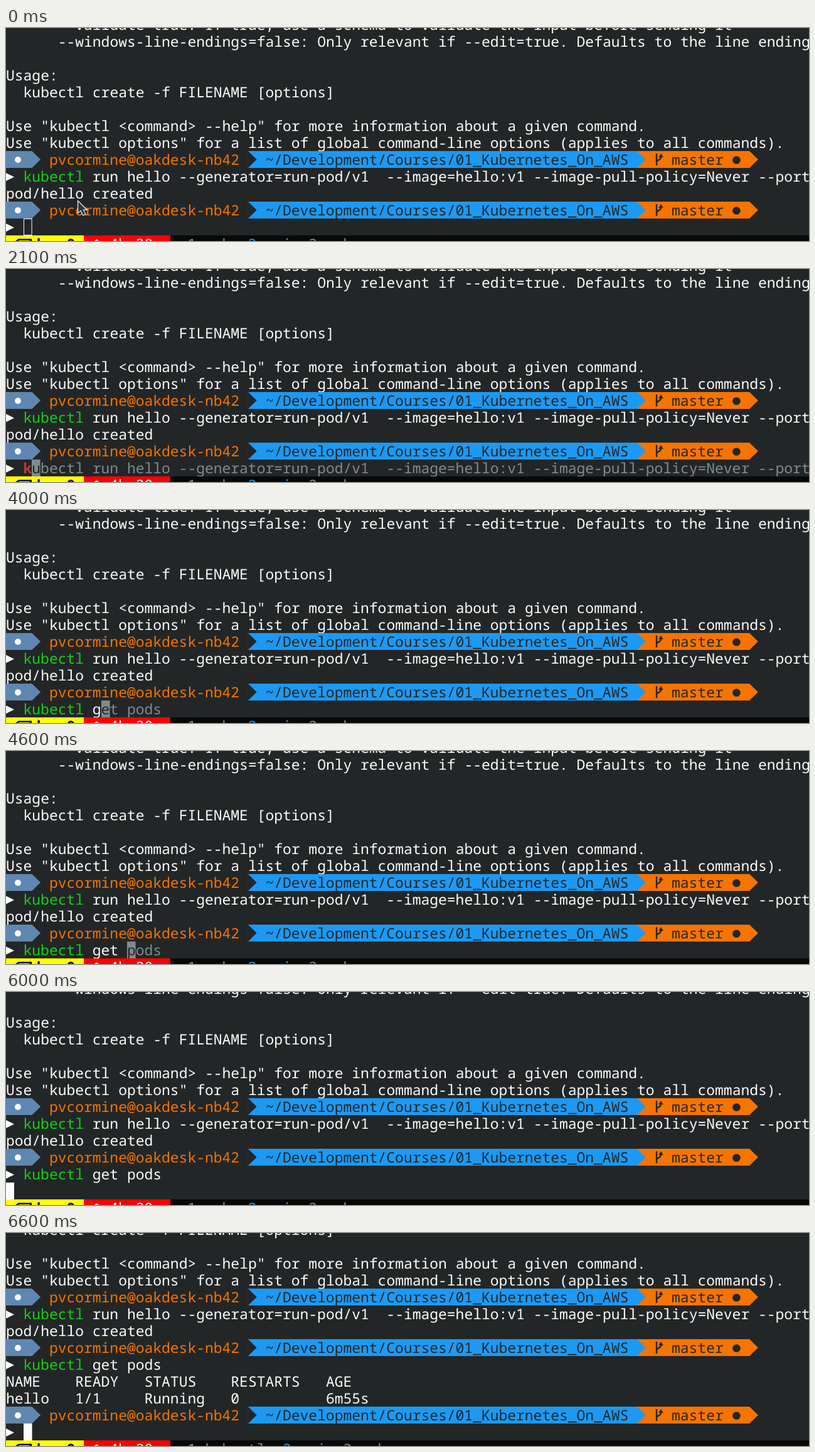
An HTML page that plays this animation: 1280x341 px, repeating every 8000 ms.

```html
<!DOCTYPE html>
<html lang="en">
<head>
<meta charset="utf-8">
<title>Terminal session</title>
<style>
html, body { margin: 0; width: 100%; height: 100%; overflow: hidden; background: #232627; }
svg { display: block; width: 1280px; height: 341px; }
text {
  font-family: "Noto Sans Mono", "DejaVu Sans Mono", monospace;
  font-size: 22.97px;
  white-space: pre;
  text-rendering: geometricPrecision;
}
</style>
</head>
<body>
<svg id="stage" viewBox="0 0 1280 341"></svg>
<script>
const LOOP = 8000, CELL = 13.78, ROW = 27, TOP = -19, BASE = 21.5, STATUS_Y = 332;
const C = {
  bg: '#232627', fg: '#fcfcfc', dim: '#7f8c8d', red: '#c0392b', green: '#11d116',
  blue: '#1d99f3', orange: '#f67400', slate: '#5f87af'
};
const CMD = 'kubectl get pods';
const RUN = 'kubectl run hello --generator=run-pod/v1  --image=hello:v1 --image-pull-policy=Never --port';

// [time, value] steps
const TYPED = [[0, 0], [2100, 1], [2400, 2], [2500, 3], [3100, 5], [3300, 6], [3500, 7], [3700, 8],
  [4000, 9], [4200, 10], [4400, 11], [4600, 12], [4800, 13], [5000, 14], [5100, 15], [5300, 16]];
const SCROLL = [[0, 0], [6000, 1], [6300, 2], [6400, 3], [6600, 4]];
const FOCUS = 1100, POINTER_OFF = 2100, RENAME = 6200;

const stage = document.getElementById('stage');
const at = (steps, t) => steps.reduce((v, s) => t >= s[0] ? s[1] : v, steps[0][1]);

function el(parent, tag, attrs, content) {
  const node = document.createElementNS(stage.namespaceURI, tag);
  for (const k in attrs) node.setAttribute(k, attrs[k]);
  if (content) node.textContent = content;
  return parent.appendChild(node);
}
const group = (parent, y = 0) => el(parent, 'g', { transform: `translate(0 ${y})` });
const text = (g, col, str, fill, weight = 400) =>
  el(g, 'text', { x: col * CELL, y: BASE, fill, 'font-weight': weight }, str);
const shape = (g, d, fill, extra) => el(g, 'path', { d, fill, ...extra });
const show = (node, on) => node.setAttribute('visibility', on ? 'visible' : 'hidden');

// Powerline segment: flat left side, pointed right side
function segment(g, from, to, fill) {
  const x = from * CELL, e = to * CELL;
  shape(g, `M${x} 0H${e}L${e + CELL} ${ROW / 2}L${e} ${ROW}H${x}Z`, fill);
}

function prompt(g) {
  segment(g, 73, 86, C.orange);
  segment(g, 28, 73, C.blue);
  segment(g, 28, 28, C.bg);
  segment(g, 0, 3, C.slate);
  el(g, 'circle', { cx: 19, cy: 14, r: 5, fill: C.fg });
  text(g, 5, 'pvcormine@oakdesk-nb42', C.orange);
  text(g, 30, '~/Development/Courses/01_Kubernetes_On_AWS', C.bg);
  shape(g, 'M1037 4V23M1037 18.5Q1037 15.5 1040 14.5Q1044 13 1044 8', 'none',
    { stroke: C.bg, 'stroke-width': 2.4 });
  shape(g, 'M1040.2 10L1044 4L1047.8 10Z', C.bg);
  text(g, 77, 'master', C.bg);
  el(g, 'circle', { cx: 84.5 * CELL, cy: 14.5, r: 6.3, fill: C.bg });
}
const marker = g => shape(g, 'M0 8L13 14.5L0 21Z', C.fg);
const plain = str => g => text(g, 0, str, C.fg);
const blank = () => {};

const LINES = [
  plain('      --validate=true: If true, use a schema to validate the input before sending it'),
  plain('      --windows-line-endings=false: Only relevant if --edit=true. Defaults to the line ending'),
  blank,
  plain('Usage:'),
  plain('  kubectl create -f FILENAME [options]'),
  blank,
  plain('Use "kubectl <command> --help" for more information about a given command.'),
  plain('Use "kubectl options" for a list of global command-line options (applies to all commands).'),
  prompt,
  g => {
    marker(g);
    text(g, 2, RUN.slice(0, 7), C.green);
    text(g, 10, RUN.slice(8), C.fg);
  },
  plain('pod/hello created'),
  prompt,
  marker,
  plain('NAME    READY   STATUS    RESTARTS   AGE'),
  plain('hello   1/1     Running   0          6m55s'),
  prompt,
  marker
];
const INPUT = 12;

el(stage, 'rect', { width: 1280, height: 341, fill: C.bg });
const screen = group(stage);
const rows = LINES.map((draw, i) => {
  const g = group(screen, TOP + i * ROW);
  draw(g);
  return g;
});
const input = rows[INPUT];
const word = text(input, 2, '', C.green);
const args = text(input, 10, '', C.fg);
const hint = text(input, 2, '', C.dim);

const caret = group(stage, TOP + INPUT * ROW);
const block = el(caret, 'rect', { height: ROW });
const under = text(caret, 0, '', C.bg);

const pointer = shape(stage,
  'M114.5 276.5V296.5L119 292.8L122.8 300L127 298L123.4 291.2H129.3Z',
  '#31363b', { stroke: '#eff0f1', 'stroke-width': 1.2 });

// Status bar, cut off by the lower edge
const bar = group(stage, STATUS_Y);
const band = (from, to, fill) =>
  el(bar, 'rect', { x: from * CELL, width: (to - from) * CELL, height: 9, fill });
band(0, 93, '#080808');
band(0, 9, '#ffff00');
band(9, 19, '#ff0000');
shape(bar, 'M20 5.5H41V9H38V8H20V9H15Z', '#000');
text(bar, 3, 'dev 0', '#000', 700);
shape(bar, 'M141 9L144.5 6L148 9Z', C.fg);
text(bar, 12, '4h 30m', C.fg);
const tab1 = text(bar, 21, '', '#8a8a8a');
const tab2 = text(bar, 28, '2 nvim', C.blue);
const tab3 = text(bar, 35, '3 zsh', '#8a8a8a');

function drawInput(n) {
  const full = n > 8 ? CMD : RUN;
  const rest = n ? full.slice(n) : '';
  word.textContent = CMD.slice(0, Math.min(n, 7));
  word.setAttribute('fill', n < 7 ? C.red : C.green);
  word.setAttribute('font-weight', n < 7 ? 700 : 400);
  args.textContent = CMD.slice(8, Math.max(n, 8));
  hint.textContent = rest.slice(1);
  hint.setAttribute('x', (n + 3) * CELL);
  return rest;
}

function drawCaret(col, char, color, solid) {
  const inset = solid ? 0 : 0.5;
  const x = Math.round(col * CELL);
  const attrs = {
    x: x + inset, y: inset, width: 13 - inset * 2 + (col === 0 ? 0 : 0.6), height: ROW - inset * 2,
    fill: solid ? color : 'none', stroke: solid ? 'none' : color
  };
  for (const k in attrs) block.setAttribute(k, attrs[k]);
  under.textContent = char;
  under.setAttribute('x', col * CELL);
}

function drawTabs(name) {
  const shift = name.length - 3;
  tab1.textContent = '1 ' + name;
  tab2.setAttribute('x', (28 + shift) * CELL);
  tab3.setAttribute('x', (35 + shift) * CELL);
}

function render(t) {
  const n = at(TYPED, t), scroll = at(SCROLL, t);
  screen.setAttribute('transform', `translate(0 ${-scroll * ROW})`);
  rows.forEach((g, i) => show(g, i <= INPUT || i < INPUT + scroll || scroll === 4));
  const rest = drawInput(n);
  const col = scroll === 0 ? n + 2 : scroll === 4 ? 2 : 0;
  drawCaret(col, rest.charAt(0), rest ? C.dim : C.fg, t >= FOCUS);
  show(pointer, t < POINTER_OFF);
  drawTabs(t >= RENAME ? 'kubectl' : 'zsh');
}

let start;
function tick(now) {
  start ??= now;
  render((now - start) % LOOP);
  requestAnimationFrame(tick);
}
render(0);
requestAnimationFrame(tick);
</script>
</body>
</html>
```
